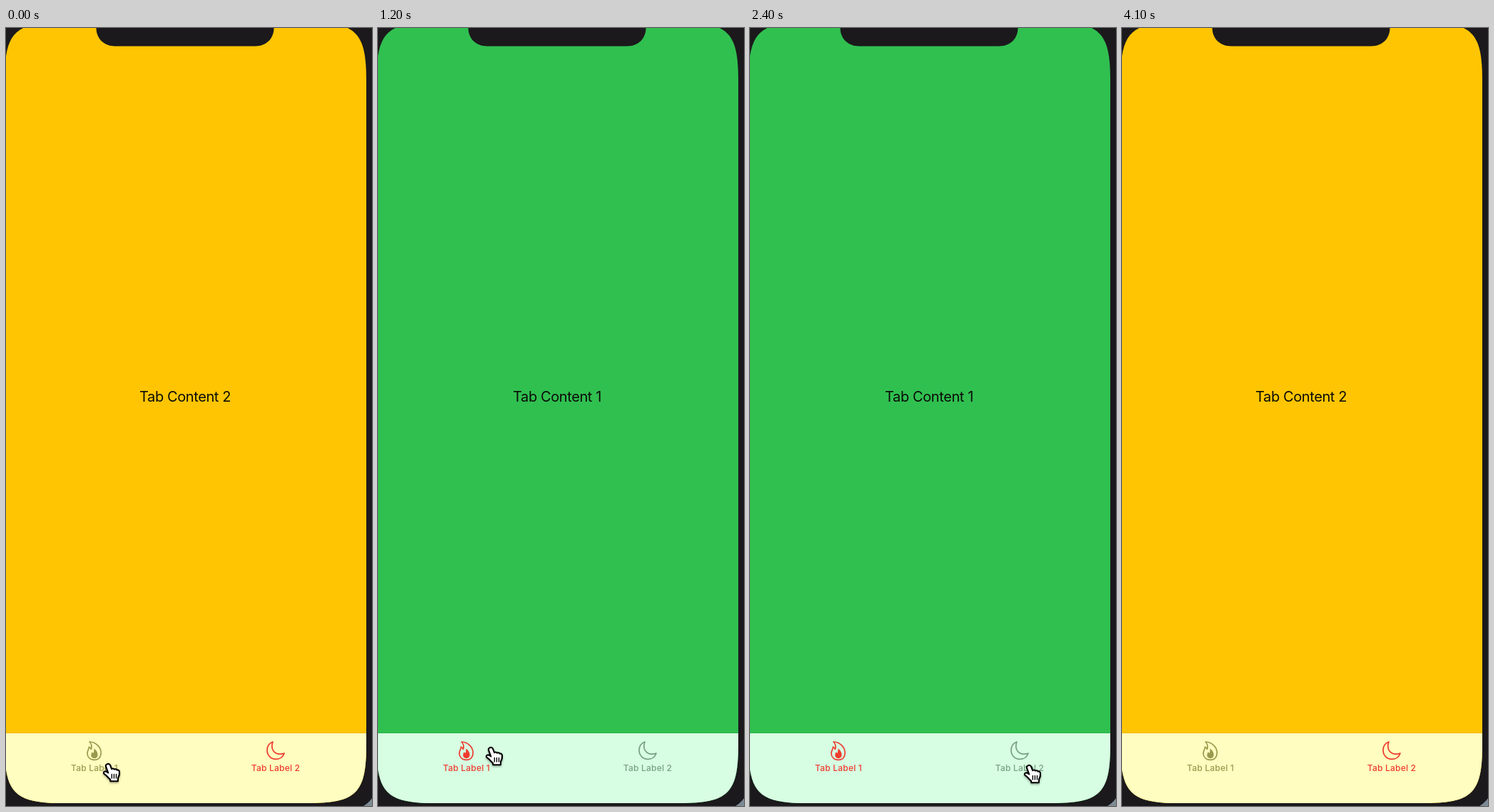
Write an HTML page with a canvas that moves like this. It is 513x1091 px and loops after 4300 ms.

```html
<!DOCTYPE html>
<html lang="en">
<head>
<meta charset="utf-8">
<title>Tab view</title>
<style>
html, body { margin: 0; width: 100%; height: 100%; overflow: hidden; background: #1b191c; }
canvas { display: block; }
</style>
</head>
<body>
<canvas id="stage" width="513" height="1091"></canvas>
<script>
const ctx = document.getElementById('stage').getContext('2d');
const LOOP = 4300, STEP = 100;
const RED = '#ee3b2e', BEZEL = '#1b191c';

const themes = {
  1: { page: '#30c050', bar: '#d7fde2', idle: '#76a085' },
  2: { page: '#ffc502', bar: '#fffdbf', idle: '#9a9a4e' }
};

// Pointer stops: time, x, y of the top-left corner
const stops = [
  [0, 136, 1031], [300, 120, 1017], [600, 120, 1017], [1000, 153, 1008],
  [1100, 153, 1008], [1200, 151, 1008], [1300, 151, 1008], [1700, 127, 1008],
  [1800, 127, 1008], [2300, 384, 1033], [4000, 384, 1033]
];

const flame = new Path2D('M117 1001C126 1001.2 133.2 1008.5 133.2 1016.5C133.2 1022.6 129.4 1026.4 124 1026.4C117.8 1026.4 114 1022.4 114 1017.2C114 1013.4 116.2 1011.8 116.4 1008.2C117.8 1008.8 118.8 1010 119.3 1011.4C120.6 1007.6 119.6 1003.6 117 1001Z');
const ember = new Path2D('M123.2 1010.6C126.4 1012.4 128.6 1015.8 128.6 1019C128.6 1022.2 126.8 1024.2 124 1024.2C121.2 1024.2 119.2 1022.4 119.2 1019.8C119.2 1018 120.2 1017 120.4 1015.2C121.3 1015.6 121.9 1016.3 122.3 1017.2C123.4 1015.2 123.6 1012.8 123.2 1010.6Z');
const moon = new Path2D('M374 1001C368.6 1003 366 1008 366 1013C366 1020 371.5 1025.3 378.5 1025.3C384 1025.3 388.5 1022 390 1017C388.5 1017.8 386.5 1018.2 384.5 1018.2C377.5 1018.2 372.8 1013.5 372.8 1007C372.8 1005 373.2 1003 374 1001Z');
const hand = new Path2D('M6 1.5C7.8 .6 9.3 1.4 9.9 3.2L12 8.5C13.2 7.4 15 7.6 15.8 9C17 8 18.8 8.4 19.4 9.9C21 9.2 22.6 10.2 22.7 12C23 15 22.5 18 20.8 20.5L20.6 25L10.5 25L10.3 22.5C7.5 20.5 6 17.5 2 15C.6 14 1 12 2.6 11.7C4.2 11.4 5.6 12.2 7.6 13.8L4.3 4.6C3.8 3.2 4.6 2 6 1.5Z');
const creases = new Path2D('M12.3 15.5V21M15.4 15.5V21M18.5 15.5V21');
const notch = new Path2D('M126.5 -8V0C126.5 14.5 137 25.5 153 25.5H349C365 25.5 375.5 14.5 375.5 0V-8Z');

// Screen with continuous corners
function screenPath(l, t, r, b) {
  const d = 82, k = 14, p = new Path2D();
  p.moveTo(l + d, t);
  p.lineTo(r - d, t);
  p.bezierCurveTo(r - k, t, r, t + k, r, t + d);
  p.lineTo(r, b - d);
  p.bezierCurveTo(r, b - k, r - k, b, r - d, b);
  p.lineTo(l + d, b);
  p.bezierCurveTo(l + k, b, l, b - k, l, b - d);
  p.lineTo(l, t + d);
  p.bezierCurveTo(l, t + k, l + k, t, l + d, t);
  return p;
}
const screen = screenPath(-2, -8, 505, 1087);

function label(text, x, y, color, font, spacing) {
  ctx.font = font + ' Inter, "Liberation Sans", sans-serif';
  ctx.letterSpacing = spacing + 'px';
  ctx.fillStyle = color;
  ctx.fillText(text, x, y);
}

function outline(path, color, width) {
  ctx.strokeStyle = color;
  ctx.lineWidth = width;
  ctx.stroke(path);
}

function pointerAt(t) {
  const i = Math.max(1, stops.findIndex(s => s[0] >= t));
  const [t0, x0, y0] = stops[i - 1], [t1, x1, y1] = stops[i];
  const u = (t - t0) / (t1 - t0), e = u * u * (3 - 2 * u);
  return [x0 + (x1 - x0) * e, y0 + (y1 - y0) * e];
}

function drawPointer(x, y) {
  ctx.save();
  ctx.translate(x, y);
  ctx.shadowColor = 'rgba(0,0,0,.4)';
  ctx.shadowBlur = 3;
  ctx.shadowOffsetY = 1.5;
  outline(hand, '#000', 2.6);
  ctx.shadowColor = 'transparent';
  ctx.fillStyle = '#fff';
  ctx.fill(hand);
  outline(hand, '#000', 1.5);
  outline(creases, '#000', 1.4);
  ctx.restore();
}

function draw(t) {
  const tab = t >= 1200 && t < 2500 ? 1 : 2;
  const theme = themes[tab];
  const tint = n => n === tab ? RED : theme.idle;

  ctx.fillStyle = BEZEL;
  ctx.fillRect(0, 0, 513, 1091);
  ctx.fillStyle = '#7d8b95';
  ctx.beginPath();
  ctx.moveTo(513, 1080);
  ctx.quadraticCurveTo(508, 1087, 501, 1091);
  ctx.lineTo(513, 1091);
  ctx.fill();

  ctx.save();
  ctx.clip(screen);
  ctx.fillStyle = theme.page;
  ctx.fillRect(-2, -8, 508, 1096);
  ctx.fillStyle = theme.bar;
  ctx.fillRect(-2, 989, 508, 99);
  ctx.fillStyle = 'rgba(0,0,0,.08)';
  ctx.fillRect(-2, 988, 508, 1);
  ctx.restore();
  ctx.fillStyle = BEZEL;
  ctx.fill(notch);

  label('Tab Content ' + tab, 251, 523.5, '#0c0c08', '400 20px', -0.4);
  label('Tab Label 1', 124, 1042, tint(1), '500 12px', 0.2);
  label('Tab Label 2', 378, 1042, tint(2), '500 12px', 0.2);
  outline(flame, tint(1), 1.7);
  ctx.fillStyle = tint(1);
  ctx.fill(ember);
  outline(moon, tint(2), 1.7);

  if (t < 4000) drawPointer(...pointerAt(t));
}

ctx.textAlign = 'center';
ctx.lineJoin = ctx.lineCap = 'round';
const start = performance.now();
function tick() {
  const t = (performance.now() - start) % LOOP;
  draw(Math.floor(t / STEP) * STEP);
  requestAnimationFrame(tick);
}
tick();
</script>
</body>
</html>
```
